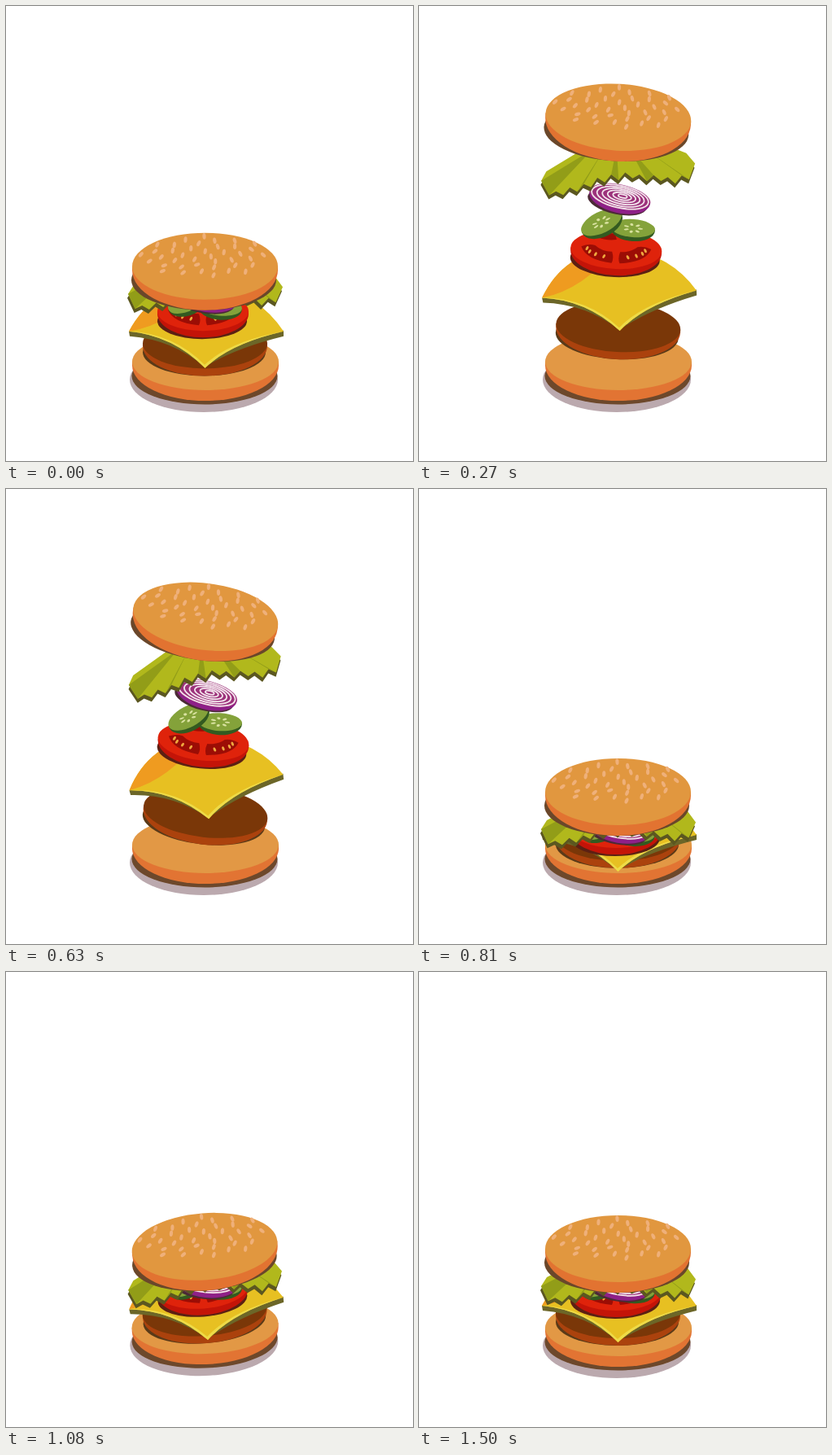
An HTML page for the animation above (2370 ms loop, 500x559 px).

```html
<!DOCTYPE html>
<html lang="en">
<head>
<meta charset="utf-8">
<title>Burger</title>
<style>
html, body { margin: 0; width: 100%; height: 100%; overflow: hidden; background: #fff; }
svg { display: block; width: 100%; height: 100%; }
</style>
</head>
<body>
<svg id="stage" viewBox="0 0 500 559"></svg>
<script>
const LOOP = 2370, STEP = 30, MID = 245;
const stage = document.getElementById('stage');

let seed = 7;
const rand = () => (seed = seed * 16807 % 2147483647) / 2147483647;
const repeat = (n, f) => Array.from({ length: n }, (_, i) => f(i));

const path = (d, fill) => `<path d="${d}" fill="${fill}"/>`;
const group = (transform, body) => `<g transform="${transform}">${body}</g>`;
const oval = (x, y, rx, ry, fill, rot = 0, extra = '') =>
  `<ellipse cx="${x}" cy="${y}" rx="${rx}" ry="${ry}" fill="${fill}" transform="rotate(${rot} ${x} ${y})" ${extra}/>`;

// A slice: a side that thins towards the ends, with the face on top.
function disc(x, y, rx, ry, h, face, side) {
  const wall = h * 0.35;
  return path(`M${x - rx} ${y}v${wall}a${rx} ${ry + h - wall} 0 0 0 ${2 * rx} 0v${-wall}z`, side) +
    oval(x, y, rx, ry, face);
}

function base() {
  return oval(243, 459, 91, 40, '#bba9ae') +
    oval(244, 454.5, 89.5, 35, '#6d482b') +
    disc(245, 437, 90, 35, 13, '#e29845', '#e27433');
}

function patty() {
  return oval(243.5, 430, 75.5, 29, '#5a3a18') +
    disc(244.5, 419, 76.5, 31, 9, '#7a3708', '#ab420d');
}

function cheese() {
  const left = 'M151 410Q205 415 244.5 455';
  return path('M151 410L152 416Q205 420 244 454Q280 431 341 416V409Z', '#6c6628') +
    path(left + 'Q275 425 341 410Q310 362 246 352Q180 355 151 410Z', '#e7c022') +
    path('M151 410Q203 402 246 352Q180 355 151 410Z', '#ef9b20') +
    path(left + 'Q275 425 341 410Q275 422 244 451Q205 412 151 410Z', '#eedb48');
}

function tomato() {
  const side = path('M247 395Q244 403 247 409Q279 406 285 390Q276 386 268 388Q260 395 247 395Z', '#9c0d05') +
    repeat(4, i => {
      const a = 0.1 + i * 0.35;
      return oval(242 + 36 * Math.cos(a), 391 + 11 * Math.sin(a), 1.5, 2.7, '#efa83f', -30);
    }).join('');
  return oval(241, 404, 55, 22, '#5c2013') +
    disc(242, 392, 56, 24, 8, '#df230b', '#c41408') +
    path('M240 373Q228 371 219 378Q228 382 242 380Z', '#9c0d05') +
    side + group('translate(484 0) scale(-1 1)', side);
}

function pickle(x, y, rx, ry, rot) {
  const pips = repeat(7, i => {
    const a = i * 360 / 7;
    return group(`translate(${x} ${y}) scale(1 .5) rotate(${a})`, oval(9, 0, 3.2, 2, '#d9e2a0'));
  });
  return group(`rotate(${rot} ${x} ${y})`,
    disc(x, y, rx, ry, 5, '#84a23a', '#335a20') + pips.join(''));
}

function onion() {
  const rings = repeat(6, k => oval(247 + k * 0.6, 383 - k * 0.3, 35.5 - k * 6, 13.6 - k * 2.3,
    'none', 0, 'stroke="#f3e4ec" stroke-width="1.8"'));
  return group('rotate(10 247 383)', oval(245, 390, 37, 15, '#4b2a35') +
    disc(247, 383, 38, 15, 5, '#9c327b', '#8e2088') + rings.join(''));
}

// Ragged lower edge, with folds fanning out from a hidden hub.
function lettuce() {
  const teeth = 23;
  const edge = repeat(teeth, i => {
    const u = i / (teeth - 1);
    const y = 398 - 8 * u + 8 * Math.cos(2 * Math.PI * u) - 20 * Math.abs(2 * u - 1) ** 10;
    const tooth = i % 2 ? 3 + 4 * rand() : -4 * rand();
    return `${150 + 190 * u} ${(y + tooth).toFixed(1)}`;
  });
  const leaf = `M157 375L${edge.join('L')}L330 364L290 345L205 350Z`;
  const folds = repeat(5, i => `M${215 + i * 15} 352L${edge[i * 5]}L${edge[i * 5 + 1]}Z`).join('');
  return group('translate(-1 5)', path(leaf, '#5b5720')) +
    path(leaf, '#b1b81c') + path(folds, '#929d18');
}

function crown() {
  const count = 40;
  const seeds = repeat(count, i => {
    const r = Math.sqrt((i + 0.5) / count), a = i * 2.4;
    const x = 243 + 79 * r * Math.cos(a), y = 328 + 26 * r * Math.sin(a);
    return oval(x, y, 2.1, 3.8, '#efb07a', (244 - x) * 0.5 + 50 * (rand() - 0.5) + (y > 336 ? 45 : 0));
  });
  return oval(243, 357, 89, 37, '#6a472a') +
    disc(244.5, 340, 89.5, 41, 13, '#e1973f', '#e27331') + seeds.join('');
}

// lift: flight height; tilt: lean at the top; delay: late take-off in ms.
const layers = [
  { body: base(), y: 450, lift: 0, tilt: 0 },
  { body: patty(), y: 425, lift: 25, tilt: 7 },
  { body: cheese(), y: 410, lift: 56, tilt: -6.5 },
  { body: tomato(), y: 398, lift: 93, tilt: 6 },
  { body: pickle(263, 391, 27, 11, 5), y: 391, lift: 118, tilt: -2 },
  { body: pickle(224, 383, 27, 13, -25), y: 383, lift: 118, tilt: -3 },
  { body: onion(), y: 383, lift: 149, tilt: 5 },
  { body: lettuce(), y: 387, lift: 178, tilt: -9 },
  { body: crown(), y: 346, lift: 205, tilt: 8, delay: 14 }
];

const clamp = u => Math.max(0, Math.min(1, u));
const span = (t, from, to) => clamp((t - from) / (to - from));
const quadOut = u => u * (2 - u);
const cubicIn = u => u * u * u;
const sine = u => (1 - Math.cos(Math.PI * u)) / 2;

// Rise and lean, drop into a squash, hop back with a kick, settle.
function pose({ lift, tilt, delay = 0 }, t) {
  const sink = Math.min(32, lift * 0.27), hop = 3;
  const up = quadOut(span(t, delay - 30, delay + 285));
  const down = cubicIn(span(t, 490, 800));
  const back = sine(span(t, 825, 1095));
  const rest = sine(span(t, 1095, 1260));
  const lean = span(t, 0, 500) ** 1.4 * (1 - down);
  const kick = lift ? -4.5 : -2;
  return {
    rise: -lift * up + (lift + sink) * down - (sink + hop) * back + hop * rest,
    turn: tilt * lean + kick * (back - rest)
  };
}

stage.innerHTML = layers.map(layer => `<g>${layer.body}</g>`).join('');
const nodes = [...stage.children];

function draw(t) {
  layers.forEach((layer, i) => {
    const { rise, turn } = pose(layer, t);
    nodes[i].setAttribute('transform',
      `translate(0 ${rise.toFixed(2)}) rotate(${turn.toFixed(2)} ${MID} ${layer.y})`);
  });
}

const start = performance.now();
function tick() {
  const t = (performance.now() - start) % LOOP;
  draw(Math.floor(t / STEP) * STEP);
  requestAnimationFrame(tick);
}
tick();
</script>
</body>
</html>
```
